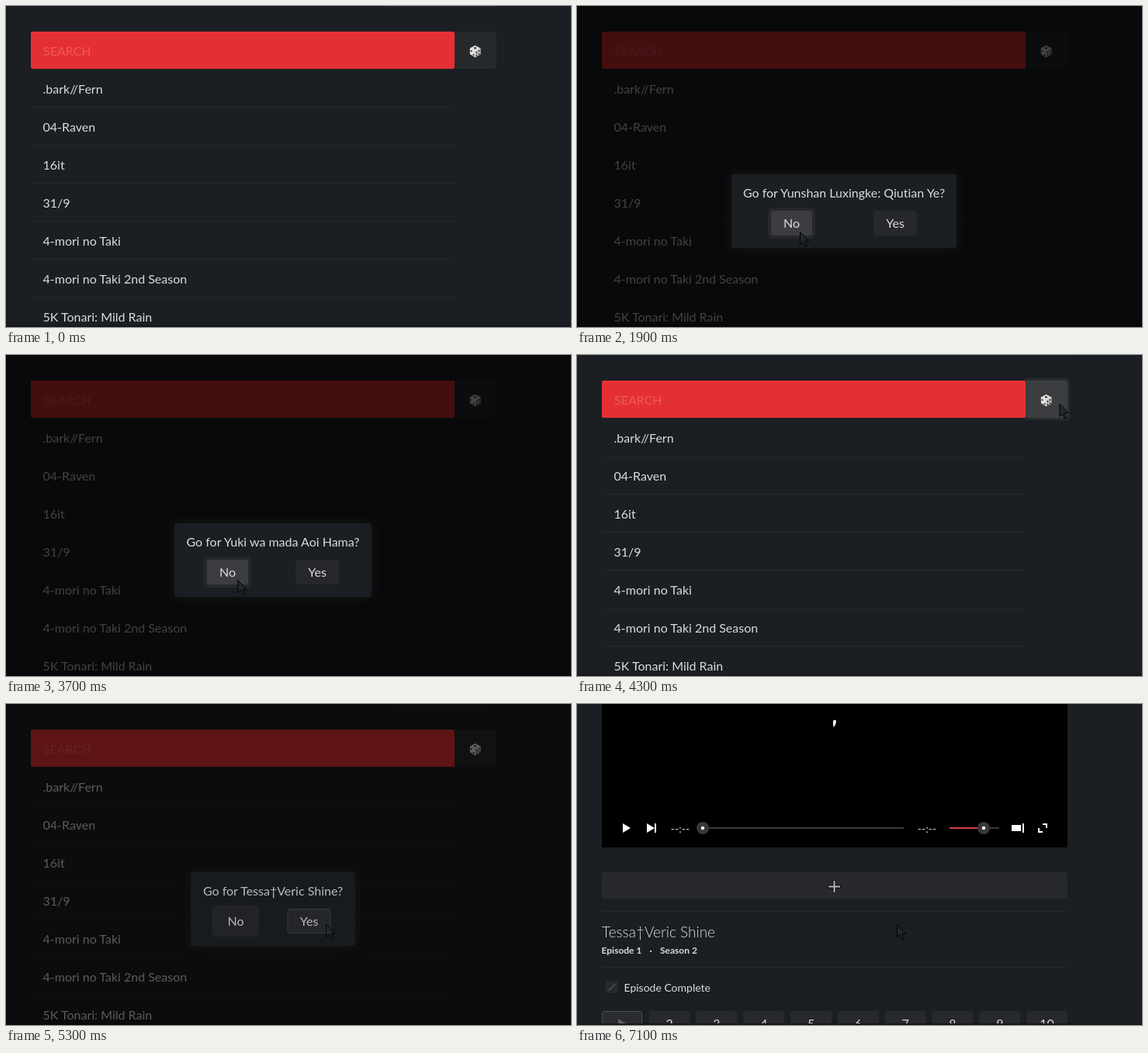
An HTML page that plays this animation: 728 by 414 pixels, repeating every 7.2 s.

```html
<!DOCTYPE html>
<html lang="en">
<head>
<meta charset="utf-8">
<title>Random pick</title>
<style>
  html, body { margin: 0; width: 100%; height: 100%; overflow: hidden; background: #1b1e22; }
  svg { display: block; width: 728px; height: 414px; }
  text { font: 16px Lato, sans-serif; fill: #dcdcdc; font-variant-ligatures: none; }
  .mid { text-anchor: middle; }
  .bold { font-size: 12px; font-weight: 700; }
  .panel { fill: #27292d; }
  .rule { fill: #25282c; }
  .white { fill: #fff; }
  #name { font-size: 19px; font-weight: 300; }
</style>
</head>
<body>
<svg viewBox="0 0 728 414">
  <rect width="728" height="414" fill="#1b1e22"/>

  <g id="list">
    <rect class="rule" x="492" width="138" height="1"/>
    <rect id="diceRing" x="575" y="30" width="60" height="54" rx="5" fill="#282b2f"/>
    <rect id="diceBox" x="578" y="33" width="54" height="48" rx="3"/>
    <rect x="32" y="33" width="546" height="48" rx="2" fill="#e53033"/>
    <text x="48" y="64" style="fill:#ed5a5b">SEARCH</text>
    <path d="M604.500 50.500l7 3.800v8l-7 4.200l-7-4.200v-8z" fill="#e0e0e0" stroke="#151515" stroke-width=".5"/>
    <path d="M604.500 58.300l7-4v8l-7 4.200z" fill="#bcbcbc"/>
    <g fill="#222">
      <circle cx="604.500" cy="54.300" r="1.300"/>
      <circle cx="599.700" cy="58" r="1"/><circle cx="602.500" cy="63" r="1"/>
      <circle cx="606.500" cy="60" r=".9"/><circle cx="609.600" cy="58" r=".9"/>
      <circle cx="606.500" cy="64" r=".9"/><circle cx="609.600" cy="62" r=".9"/>
    </g>
  </g>

  <g id="player">
    <rect x="32" width="600" height="185"/>
    <path id="spinner" class="white" d="M330 22.500Q330.500 18 333.300 15Q334.300 19 334 22.500A2 2 0 0 1 330 22.500z"/>
    <g id="controls">
      <path class="white" d="M59 154l10 6l-10 6z"/>
      <g id="extras">
        <path class="white" d="M90 154l10 6l-10 6zM100 154h2v12h-2z"/>
        <text class="mid" x="133" y="166" style="font-size:14px">--:--</text>
        <text class="mid" x="451" y="166" style="font-size:14px">--:--</text>
      </g>
      <rect id="track" y="159" height="2" fill="#3a3a3c"/>
      <g id="seek"><circle r="8" fill="#38383a"/><circle class="white" r="2.200"/></g>
      <rect x="480" y="159" width="64" height="2" fill="#3a3a3c"/>
      <rect id="level" x="480" y="159" height="2" fill="#d83b48"/>
      <g id="volume"><circle r="8" fill="#38383a"/><circle class="white" r="2.200"/></g>
      <path class="white" d="M560 156h12v8h-12zM574 154h2v12h-2z"/>
      <path d="M600 155h5v5M595 160v5h5" fill="none" stroke="#fff" stroke-width="2"/>
    </g>
    <rect class="panel" x="32" y="217" width="600" height="34" rx="3"/>
    <path d="M323 235.500h17M331.500 227v17" stroke="#0c0d0f" stroke-width="4"/>
    <path d="M324 235.500h15M331.500 228v15" stroke="#b4b5b7" stroke-width="2"/>
    <rect class="rule" x="32" y="267" width="600" height="1"/>
    <text id="name" x="32" y="301">Tessa†Veric Shine</text>
    <text class="bold" x="31.500" y="322">Episode 1</text>
    <text class="bold" x="93.500" y="322">·</text>
    <text class="bold" x="107" y="322">Season 2</text>
    <rect class="rule" x="32" y="339" width="600" height="1"/>
    <rect class="panel" x="37" y="357" width="16" height="16" rx="2"/>
    <path d="M40.500 370l9-9" stroke="#55575b" stroke-width="1.300"/>
    <path id="cross" stroke="#55575b" stroke-width="1.300"/>
    <text x="60.500" y="371" style="font-size:14px">Episode Complete</text>
  </g>

  <rect y="412" width="728" height="2" fill="#15171a"/>
  <rect id="shade" width="728" height="414"/>

  <g id="dialog">
    <rect id="box" y="217" height="95" rx="2" fill="#1b1e22" style="filter:drop-shadow(0 0 7px #1a1918)"/>
    <text id="ask" class="mid" x="344" y="247"></text>
    <g id="no">
      <rect x="-30.500" y="260" width="61" height="40" rx="6" fill="#26282c"/>
      <rect id="noBox" x="-26.500" y="264" width="53" height="32" rx="3"/>
      <text class="mid" y="286">No</text>
    </g>
    <g id="yes">
      <rect id="yesBox" x="-27.500" y="264.500" width="55" height="31" rx="3"/>
      <text class="mid" y="286">Yes</text>
    </g>
  </g>

  <path id="cursor" d="M.5 .5v16l3.700-3.300l2.700 6.300l2.700-1.100l-2.700-6.200h4.600z" fill="#25282c" stroke="#000"/>
</svg>
<script>
const LOOP = 7200, SWITCH = 5450;
const titles = ['.bark//Fern', '04-Raven', '16it', '31/9', '4-mori no Taki',
  '4-mori no Taki 2nd Season', '5K Tonari: Mild Rain'];
const picks = [
  { until: 2400, text: 'Yunshan Luxingke: Qiutian Ye', width: 290 },
  { until: 4100, text: 'Yuki wa mada Aoi Hama', width: 254 },
  { until: LOOP, text: 'Tessa†Veric Shine', width: 212 }
];
// pointer stops: time, x, y
const stops = [[100, 728, 150], [500, 622, 62], [650, 622, 62], [1100, 290, 267],
  [1200, 290, 267], [1400, 287, 291], [2000, 287, 291], [2600, 627, 62], [2700, 627, 62],
  [3500, 297, 291], [3700, 297, 291], [4200, 622, 62], [4300, 622, 62], [5000, 412, 284]];

const $ = id => document.getElementById(id);
const set = (id, attrs) => { for (const k in attrs) $(id).setAttribute(k, attrs[k]); };
const clamp = u => Math.min(1, Math.max(0, u));
const mix = (a, b, u) => a + (b - a) * u;

$('list').insertAdjacentHTML('beforeend', titles.map((s, i) =>
  `<text x="47.500" y="${113 + 49 * i}">${s}</text>
   <rect class="rule" x="32" y="${130 + 49 * i}" width="546" height="1"/>`).join(''));

let cells = '';
for (let i = 0; i < 10; i++) {
  const x = 32 + 60.8 * i;
  cells += `<rect class="panel" x="${x}" y="396" width="52.800" height="40" rx="3"/>` + (i
    ? `<text class="mid" x="${x + 26.4}" y="418">${i + 1}</text>`
    : `<rect x="32.500" y="396.500" width="51" height="40" rx="3" fill="#2a2c30" stroke="#4b4d51"/>
       <path d="M53 406l10 6l-10 6z" fill="#5c5e62"/>`);
}
$('player').insertAdjacentHTML('beforeend', cells);

function pointer(t) {
  const i = stops.findIndex(s => s[0] > t);
  if (i < 0) return stops[stops.length - 1].slice(1);
  if (!i) return [800, 150];
  const [t0, x0, y0] = stops[i - 1], [t1, x1, y1] = stops[i];
  const u = 1 - (1 - (t - t0) / (t1 - t0)) ** 2;
  return [mix(x0, x1, u), mix(y0, y1, u)];
}

function draw(t) {
  const ramp = (a, b) => { const u = clamp((t - a) / (b - a)); return u * u * (3 - 2 * u); };
  const [x, y] = pointer(t);
  const over = (left, top, w, h) => x >= left && x <= left + w && y >= top && y <= top + h;
  const dim = ramp(600, 800) - ramp(2050, 2300) + ramp(2700, 2800)
    - ramp(3720, 3950) + ramp(4300, 4400) - ramp(5250, SWITCH);
  const open = dim > .5;

  set('cursor', { transform: `translate(${x} ${y})` });
  set('list', { display: t < SWITCH ? 'inline' : 'none' });
  set('player', { display: t < SWITCH ? 'none' : 'inline' });
  set('shade', { opacity: .7 * dim });

  const onDice = !open && over(578, 33, 54, 48);
  set('diceRing', { opacity: +onDice });
  set('diceBox', { fill: onDice ? '#3b3d40' : '#26292c' });

  const pick = picks.find(p => t < p.until);
  const half = (pick.width - 23) / 4, noX = 343.25 - half, yesX = 343.25 + half;
  const onNo = open && over(noX - 26.5, 264, 53, 32);
  const onYes = open && over(yesX - 28, 264, 56, 32);
  set('dialog', { opacity: dim });
  set('box', { x: 344 - pick.width / 2, width: pick.width });
  $('ask').textContent = `Go for ${pick.text}?`;
  set('no', { transform: `translate(${noX} 0)` });
  set('yes', { transform: `translate(${yesX} 0)` });
  set('noBox', { fill: onNo ? '#3b3d40' : '#26282c' });
  set('yesBox', { fill: onYes ? '#292b2f' : '#26282c', stroke: onYes ? '#404246' : '#26282c' });

  const slide = ramp(6000, 6300);
  const start = mix(130, 162, slide), loud = mix(480, 524, slide), end = mix(418, 421, slide);
  set('spinner', { transform: `rotate(${(t - 5600) * .36} 332 22.500)` });
  set('controls', { opacity: ramp(5500, 6000) });
  set('extras', { opacity: slide });
  set('track', { x: start, width: end - start });
  set('seek', { transform: `translate(${start} 160)` });
  set('level', { width: loud - 480 });
  set('volume', { transform: `translate(${loud} 160)` });
  set('name', { opacity: ramp(6050, 7000) });
  const arm = 4.5 * (1 - ramp(6100, 6400));
  set('cross', { d: `M${45 - arm} ${365.5 - arm}L${45 + arm} ${365.5 + arm}` });
}

const begin = performance.now();
function tick() {
  draw((performance.now() - begin) % LOOP);
  requestAnimationFrame(tick);
}
tick();
</script>
</body>
</html>
```
